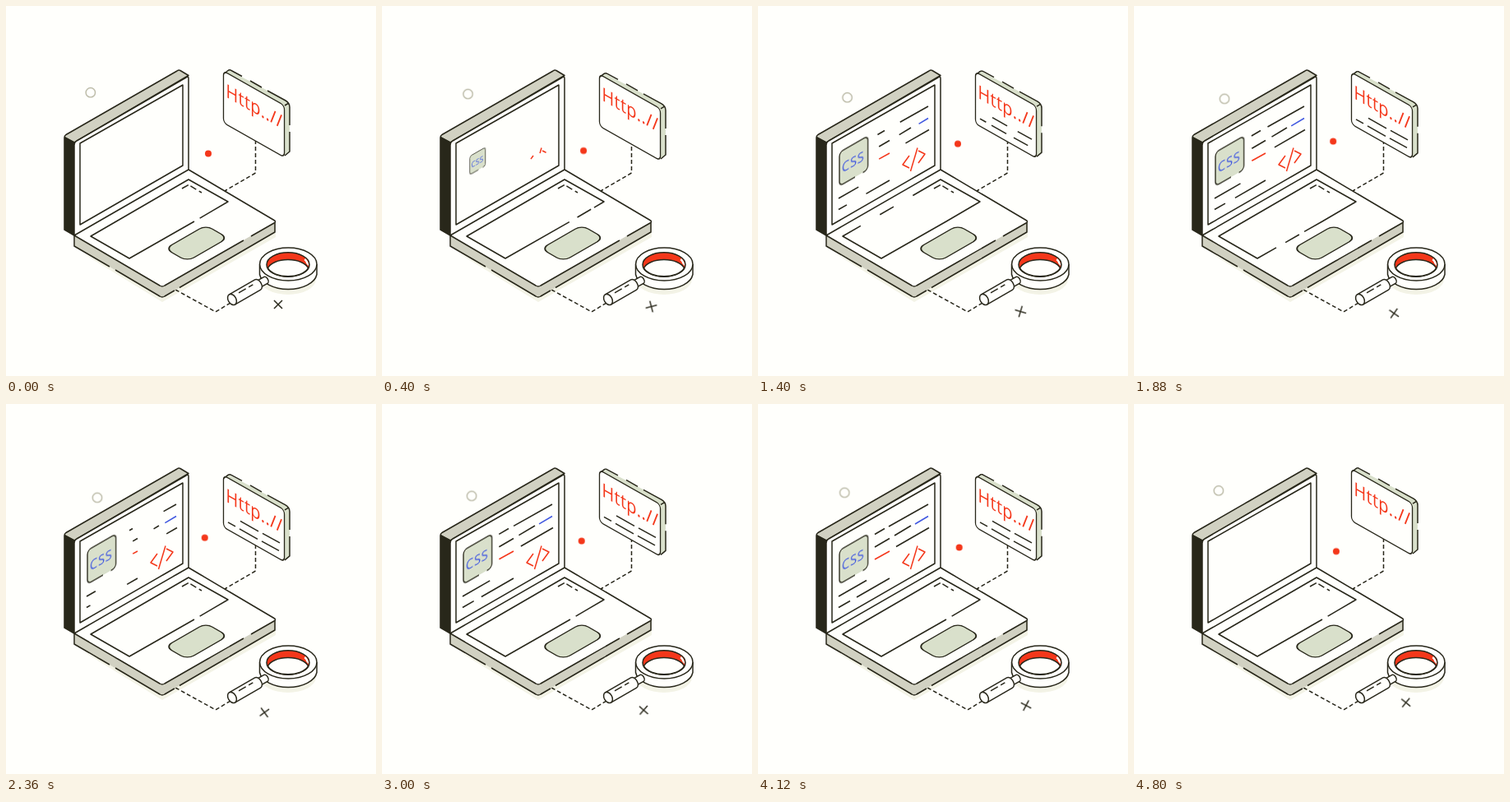
Write an HTML page without scripts that moves like this. It is 450 by 450 pixels and loops after 4840 ms.

```html
<!DOCTYPE html>
<html lang="en">
<head>
<meta charset="utf-8">
<title>Laptop and search</title>
<style>
  :root { --ink: #28271a; --paper: #fffffc; --beige: #d1d1c2; --green: #d9e0cb; --red: #f4371a; --blue: #4058e0; --loop: 4840ms; }
  html, body { margin: 0; width: 100%; height: 100%; overflow: hidden; background: var(--paper); }
  svg { display: block; width: 100vw; height: 100vh; }
  .line { fill: none; stroke: var(--ink); stroke-width: 1.5; stroke-linejoin: round; }
  .face { fill: var(--paper); }
  .side { fill: var(--beige); }
  .pad { fill: var(--green); }
  .shade { fill: #f3f3e6; }
  .dashed { stroke-dasharray: 5 3; }
  .hot { stroke: var(--red); }
  .cool { stroke: var(--blue); --rest: .15; }
  .red { fill: var(--red); }
  text { font-family: "Open Sans", "Noto Sans", sans-serif; }

  .drift { animation: drift var(--loop) infinite; }
  @keyframes drift {
    0% { transform: none; animation-timing-function: cubic-bezier(.33, .4, .67, .9); }
    50% { transform: translate(var(--dx), var(--dy)); animation-timing-function: linear; }
    100% { transform: none; }
  }
  .spin { animation: spin calc(var(--loop) / 2) linear infinite alternate; }
  @keyframes spin { to { transform: rotate(-360deg); } }

  .bob { animation: bob calc(var(--loop) / 6) ease-in-out infinite alternate; }
  @keyframes bob { to { transform: translateY(8px); } }

  .pop { transform-box: fill-box; transform-origin: center; animation: pop var(--loop) ease-in-out infinite; }
  @keyframes pop {
    0%, 3% { transform: scale(0); }
    13%, 88% { transform: none; }
    97%, 100% { transform: scale(0); }
  }

  .write path { stroke-dasharray: 1 2; animation: write var(--loop) ease-in-out infinite; }
  @keyframes write {
    0%, 17% { stroke-dashoffset: 1; }
    36% { stroke-dashoffset: 0; }
    48.5% { stroke-dashoffset: var(--rest, .68); }
    64%, 87% { stroke-dashoffset: 0; }
    97%, 100% { stroke-dashoffset: 1; }
  }
  .note path { animation-name: note; }
  @keyframes note {
    0%, 12% { stroke-dashoffset: 1; }
    36%, 87% { stroke-dashoffset: 0; }
    97%, 100% { stroke-dashoffset: 1; }
  }
  .code path { animation-name: code; }
  @keyframes code {
    0%, 4% { stroke-dashoffset: 1; }
    17%, 88% { stroke-dashoffset: 0; }
    97%, 100% { stroke-dashoffset: 1; }
  }

  .keys { animation: keys var(--loop) ease-in-out infinite; }
  @keyframes keys {
    0%, 6% { stroke-dasharray: 0 2 5 0 93 0; stroke-dashoffset: 0; }
    15.7% { stroke-dasharray: 0 10 5 10 75 0; stroke-dashoffset: 3; animation-timing-function: ease-in; }
    29% { stroke-dasharray: 0 7 5 7 81 0; stroke-dashoffset: -37; animation-timing-function: ease-out; }
    47%, 100% { stroke-dasharray: 0 2 5 0 93 0; stroke-dashoffset: -100; }
  }
</style>
</head>
<body>
<svg viewBox="0 0 450 450">
  <!-- shadows -->
  <path class="shade" d="M92 300 190 360 328 281V270L190 348Z"/>
  <ellipse class="shade" cx="343" cy="332" rx="34" ry="19"/>

  <!-- connectors -->
  <g class="line dashed">
    <path d="M303.500 163V203L266 225"/>
    <path d="M206 345 255 372 273 361"/>
  </g>

  <!-- base -->
  <g class="line">
    <path class="side" stroke="none" d="M83 279V292L187 353Q190 355 193 353L328 274V262L190 341Z"/>
    <path class="face" stroke="none" d="M83 279 222 199 328 262 193 340Q190 342 187 340Z"/>
    <path d="M222 199 326 260.500Q329 262 326 264L298 280M289 285 193 340Q190 342 187 340L83 279"/>
    <path d="M83 279V292L126 317M133 321 187 353Q190 355 193 353L205 346M211 342.500 327 275V263"/>
    <path class="keys" pathLength="100" d="M229 262 270 238 222 211 103 280 150 307Z"/>
    <path stroke-dasharray="9 3 8 4" d="M214 222 222 217.500 238 227"/>
    <rect class="pad" width="31" height="57" rx="9" transform="matrix(.866 .5 -.866 .5 243 266.500)"/>
  </g>

  <!-- lid -->
  <g class="line">
    <path class="side" d="M83 166 72 160Q70 159 73 156.500L208 79Q210 77.500 212 78.500L222 84.500Z"/>
    <path fill="#28271a" d="M71 160 83 166V279L71 272Z"/>
    <path class="face" d="M83 169Q83 166 86 164L219 87Q222 85 222 88V199L83 279Z"/>
    <path d="M90 167 215 96V194L90 266Z"/>
  </g>

  <!-- screen content -->
  <g class="pop">
    <g transform="matrix(.866 -.5 0 1 99 178)">
      <rect class="pad" width="40" height="41" rx="5"/>
      <path class="line" d="M22 41H5A5 5 0 0 1 0 36V5A5 5 0 0 1 5 0H35A5 5 0 0 1 40 5V36A5 5 0 0 1 35 41H33"/>
      <text x="3.500" y="27.500" font-size="17" letter-spacing=".8" fill="#4058e0">CSS</text>
    </g>
  </g>
  <g class="line write code">
    <path class="hot" pathLength="1" d="M184 182 176 193 184 197"/>
    <path class="hot" pathLength="1" d="M194 172.500 185.500 201"/>
    <path class="hot" pathLength="1" d="M195 176 203 180 195 191"/>
  </g>
  <g class="line write">
    <path pathLength="1" d="M154 151.500 142 158.500"/>
    <path pathLength="1" d="M207 122 159 149"/>
    <path pathLength="1" d="M160 163.500 142 174"/>
    <path pathLength="1" d="M186 148 166 160"/>
    <path class="cool" pathLength="1" d="M207 136.500 191 146"/>
    <path class="hot" pathLength="1" d="M160 179 142 189"/>
    <path pathLength="1" d="M208 150.500 168 173.500"/>
    <path pathLength="1" d="M98 234 132 214.500"/>
    <path pathLength="1" d="M98 247.500 112 239.500"/>
    <path pathLength="1" d="M160 212 120 235"/>
  </g>

  <!-- address card -->
  <g class="bob">
    <path class="pad" d="M265 83 271 78 341 115Q345 118 345 122V177L338 182Z"/>
    <path class="line" d="M265.500 82 270 78.500Q272 77 274 78.500L287 85.500M297 91 311 99M318 103 340 115Q345 118 345 123V145M345 153V177L339 182M339 121 344 118"/>
    <rect class="line face" width="85.500" height="63" rx="5" transform="matrix(.866 .49 0 1 264.500 79)"/>
    <text transform="matrix(.866 .49 0 1 267.500 110.500)" font-size="23" letter-spacing=".4" class="red">Http..//</text>
    <g class="line write note">
      <path pathLength="1" d="M285 134.500 307 147"/>
      <path pathLength="1" d="M333 161 312 149.500"/>
      <path pathLength="1" d="M270 136 279 141"/>
      <path pathLength="1" d="M284 144 306 156.500"/>
      <path pathLength="1" d="M311 159 332 170.500"/>
    </g>
  </g>

  <!-- magnifier -->
  <g class="line">
    <path class="face" d="M308.500 314V326.500A35 20.500 0 0 0 378 326.500V314"/>
    <ellipse class="face" cx="343.300" cy="314" rx="34.700" ry="20"/>
    <ellipse class="red" cx="343" cy="314.500" rx="26" ry="14.800"/>
    <path class="face" d="M318.500 319A25 13 0 0 1 367.500 319A26 14.800 0 0 1 318.500 319Z"/>
    <path class="face" stroke="none" d="M364 307Q368.500 311 368 316L365.500 313.500Q365 311 362.500 309Z"/>
    <g class="face" transform="translate(275 357) rotate(-30)">
      <path d="M34-4.500H47A3 4.500 0 0 1 47 4.500H34Z"/>
      <path d="M0-7H36A4.500 7 0 0 1 36 7H0Z"/>
      <ellipse rx="4.800" ry="7"/>
      <path d="M11-3H21M25-3H31"/>
    </g>
  </g>

  <!-- floating marks -->
  <g class="drift" style="--dx: 8.300px; --dy: 8.700px">
    <circle cx="102.800" cy="105.200" r="5.700" fill="none" stroke="#b9b8a4" stroke-width="1.400"/>
  </g>
  <g class="drift" style="--dx: -4.300px; --dy: -17px">
    <circle class="red" cx="246" cy="179.400" r="4"/>
  </g>
  <g class="drift" style="--dx: -16.800px; --dy: 12.300px">
    <g transform="translate(331 363)">
      <path class="line spin" d="M-5-5 5 5M5-5-5 5"/>
    </g>
  </g>
</svg>
</body>
</html>
```
